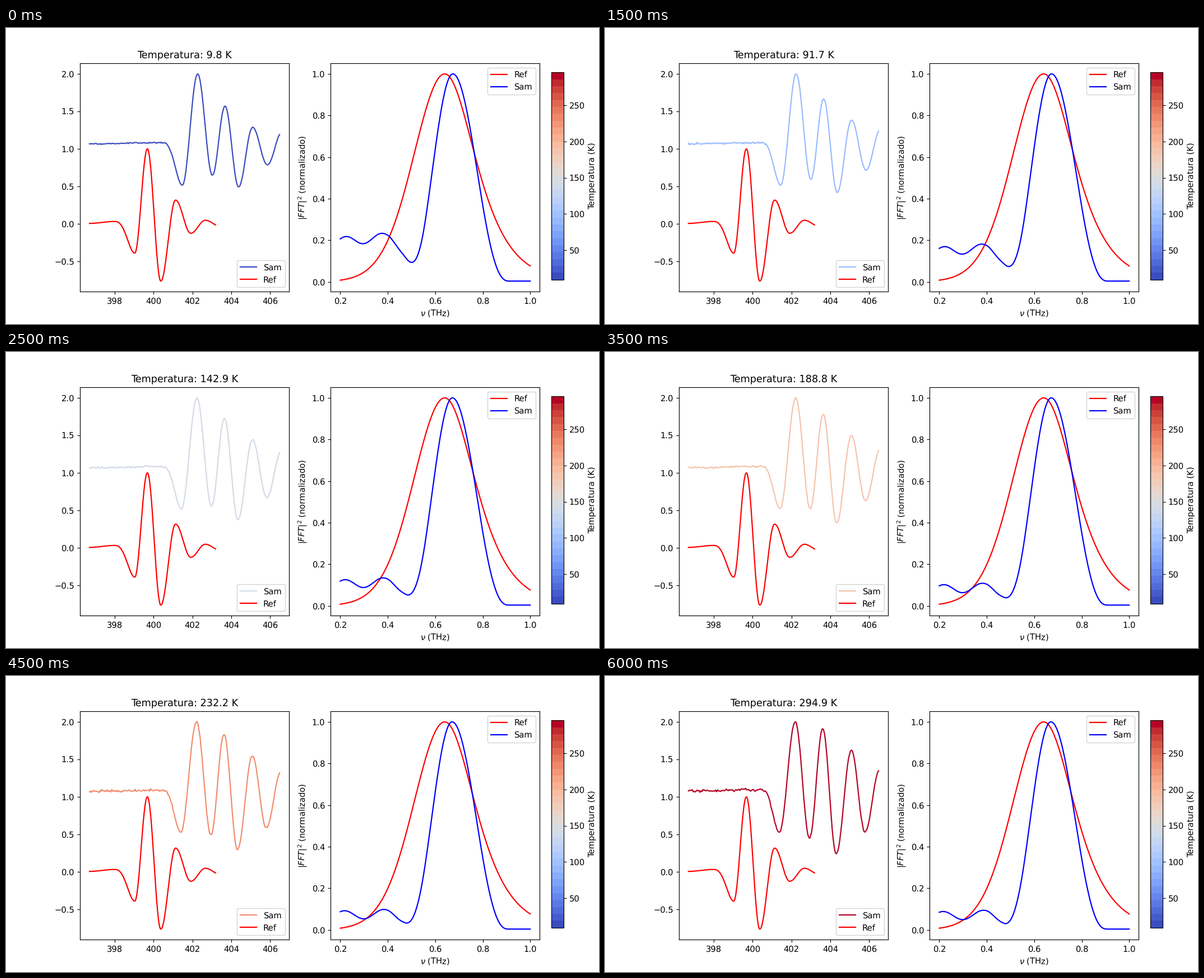
Write a matplotlib script that moves like this. It is 1058 px wide and 529 px high and loops after 6.5 s.

```python
import numpy as np
import matplotlib.pyplot as plt
from matplotlib.animation import FuncAnimation
from matplotlib.cm import ScalarMappable
from matplotlib.colors import Normalize

plt.rcParams["font.family"] = "DejaVu Sans"
plt.rcParams["text.hinting"] = "no_hinting"

temps = np.interp(range(13), [0, 3, 5, 7, 8, 10, 12],
                  [9.8, 91.7, 142.9, 188.8, 210.8, 253.5, 294.9])
norm = Normalize(temps[0], temps[-1])
cmap = plt.get_cmap("coolwarm")


def lerp(cold, warm, t):
    return np.asarray(cold) * (1 - t) + np.asarray(warm) * t


def smoothstep(x, start, end):
    t = np.clip((x - start) / (end - start), 0, 1)
    return t * t * (3 - 2 * t)


def wave(x, turns, heights):
    """Half cosines between turning points; the onset segment starts slowly."""
    turns, heights = np.asarray(turns), np.asarray(heights)
    i = np.clip(np.searchsorted(turns, x, side="right") - 1, 0, len(turns) - 2)
    t = (x - turns[i]) / (turns[i + 1] - turns[i])
    t = np.where(i == 1, t ** 1.4, t)
    return lerp(heights[i], heights[i + 1], (1 - np.cos(np.pi * t)) / 2)


def sech_power(d, width, power):
    return np.cosh(d / width) ** -power


def sample_pulse(frame, warmth):
    turns = lerp([401.474, 402.266, 403.024, 403.673, 404.371, 405.091, 405.855, 406.60],
                 [401.373, 402.194, 402.929, 403.607, 404.298, 405.077, 405.783, 406.53],
                 warmth)
    heights = lerp([.513, 2, .648, 1.570, .491, 1.286, .786, 1.22],
                   [.524, 2, .446, 1.910, .237, 1.622, .532, 1.36], warmth)
    base = 1.066 + .012 * warmth ** 2
    x = np.linspace(396.7, 406.481, 197)
    y = wave(x, [396.7, 400.45, *turns], [base, base + .015, *heights])
    noise = np.random.default_rng(frame).normal(0, .004 + .006 * warmth, x.size)
    return x, np.minimum(y + noise * np.where(x > 401, .5, 1), 2)


def sample_spectrum(warmth, temp):
    d = freq - lerp(.674, .670, warmth)
    half_width = np.where(d < 0, .2, .237)
    lobe = np.cos(np.pi / 2 * np.clip(d / half_width, -1, 1)) ** 2.5

    level = .07 + .135 * np.exp(-((temp - temps[0]) / 120) ** 2)
    phase = (freq - .373 - .012 * warmth) / (.15 + .02 * warmth)
    ripple = level * (.85 + freq / 2) + .021 * np.cos(2 * np.pi * phase)
    ripple *= 1 - smoothstep(freq, .40, .56)
    return np.minimum(lobe + ripple + .004 * smoothstep(freq, .8, .9), 1)


ref_time = np.linspace(396.7, 403.18, 300)
ref_pulse = wave(
    ref_time,
    [396.7, 397.97, 399.03, 399.68, 400.37, 401.13, 401.91, 402.66, 403.43],
    [.004, .03, -.393, 1, -.766, .315, -.128, .046, -.036])

freq = np.linspace(.2, 1, 401)
ref_spectrum = np.where(freq < .64, sech_power(freq - .64, .369, 8.14),
                        sech_power(freq - .64, .1405, 1.37))

fig, (ax_time, ax_freq) = plt.subplots(1, 2, figsize=(10, 5), dpi=105.8)
fig.colorbar(ScalarMappable(norm, cmap.resampled(30)),
             cax=fig.add_axes([.92, .15, .02, .7]), label="Temperatura (K)")


def draw(frame):
    temp = temps[frame]
    warmth = norm(temp)

    ax_time.clear()
    ax_time.plot(*sample_pulse(frame, warmth), color=cmap(warmth), label="Sam")
    ax_time.plot(ref_time, ref_pulse, color="red", label="Ref")
    ax_time.set(xlim=(396.22, 406.965), ylim=(-.9043, 2.1383),
                title=f"Temperatura: {temp:.1f} K")
    ax_time.legend(loc="lower right")

    ax_freq.clear()
    ax_freq.plot(freq, ref_spectrum, color="red", label="Ref")
    ax_freq.plot(freq, sample_spectrum(warmth, temp), color="blue", label="Sam")
    ax_freq.set(xlabel=r"$\nu$ (THz)", ylabel=r"$|FFT|^2$ (normalizado)")
    ax_freq.legend(loc="upper right")


anim = FuncAnimation(fig, draw, frames=len(temps), init_func=lambda: None,
                     interval=500, repeat=True, repeat_delay=0)
plt.show()
```
